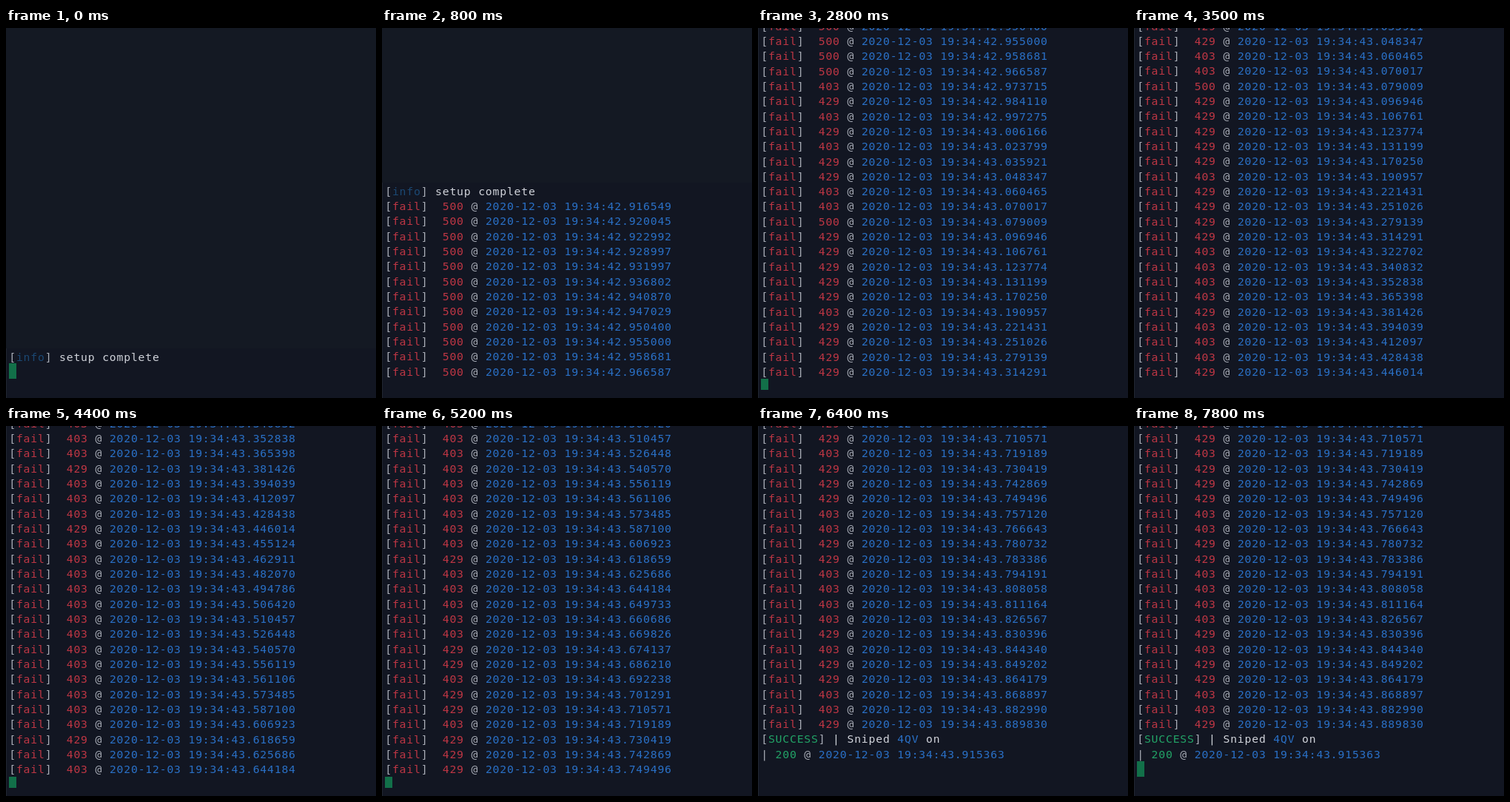
Recreate the animation shown at these times as an HTML page. Size 500 by 500 pixels, loop 8000 ms.

```html
<!DOCTYPE html>
<html lang="en">
<head>
<meta charset="utf-8">
<title>Terminal log</title>
<style>
  html, body { margin: 0; width: 100%; height: 100%; overflow: hidden; background: #141923; }
  #stage { position: relative; width: 500px; height: 500px; overflow: hidden; }
  #floor { position: absolute; inset: 0; background: #121622; box-shadow: inset 1px 0 #20252f; }
  #view { position: absolute; left: 0; top: 0; width: 500px; overflow: hidden; }
  #log {
    position: absolute; left: 4.2px; top: 1.6px;
    font: 14.8px/20.34px "DejaVu Sans Mono", "Noto Sans Mono", monospace;
    letter-spacing: .78px; color: #a9adb7; white-space: pre;
  }
  #log div { height: 20.34px; }
  #cursor { position: absolute; left: 4px; width: 10px; background: #127049; }
  .info { color: #1b4873; }
  .fail { color: #bd3644; }
  .time { color: #2a70c6; }
  .good { color: #22a266; }
  .say { color: #d0d3da; }
</style>
</head>
<body>
<div id="stage">
  <div id="floor"></div>
  <div id="view"><div id="log"></div></div>
  <div id="cursor"></div>
</div>
<script>
const LOOP = 8000, ROW = 20.34, TOP = 6, ROWS = 23;
const $ = id => document.getElementById(id);

// Key points: refresh number, replies by then, microseconds past 19:34:42,
// and the share of 500 and 429 codes on the way there (the rest are 403).
const keys = [
  [1, 0, 912000, 0, 0],
  [3, 12, 966587, 1, 0],
  [6, 25, 1123774, .15, .5],
  [11, 32, 1314291, 0, .85],
  [14, 41, 1446014, 0, .55],
  [18, 57, 1644184, 0, .06],
  [23, 77, 1826567, 0, .35],
  [26, 86, 1915363, 0, .55]
];
const rests = [0, 77, 86]; // reply counts that leave a blank row below the cursor

let seed = 7;
const random = () => (seed = seed * 16807 % 2147483647) / 2147483647;

const span = (name, text) => `<span class="${name}">${text}</span>`;
function stamp(micro) {
  const seconds = (42 + Math.round(micro) / 1e6).toFixed(6);
  return span("time", `2020-12-03 19:34:${seconds}`);
}
function pickCode(share500, share429) {
  const roll = random();
  return roll < share500 ? 500 : roll < share500 + share429 ? 429 : 403;
}

const lines = [`[${span("info", "info")}] ${span("say", "setup complete")}`];
keys.slice(1).forEach(([, last, end, share500, share429], k) => {
  const [, first, start] = keys[k];
  const count = last - first;
  for (let n = 1; n <= count; n++) {
    const wobble = n < count ? random() * .8 : 0;
    const micro = start + (end - start) * (n - wobble) / count;
    const code = pickCode(share500, share429);
    lines.push(`[${span("fail", "fail")}]  ${span("fail", code)} @ ${stamp(micro)}`);
  }
});
lines.splice(-2, 2,
  `[${span("good", "SUCCESS")}] ${span("say", "| Sniped")} ${span("time", "4QV")} ${span("say", "on")}`,
  `| ${span("good", "200")} @ ${stamp(keys.at(-1)[2])}`
);
$("log").innerHTML = lines.map(line => `<div>${line}</div>`).join("");

function repliesAt(refresh) {
  const next = keys.findIndex(key => key[0] > refresh);
  if (next === 0) return 0;
  if (next < 0) return keys.at(-1)[1];
  const [r0, n0] = keys[next - 1], [r1, n1] = keys[next];
  return Math.round(n0 + (n1 - n0) * (refresh - r0) / (r1 - r0));
}

function draw(t) {
  // The screen refreshes every 240 ms, aligned up to tenths of a second.
  const refresh = Math.floor((Math.floor(t / 100) * 100 - 80) / 240);
  const shownAt = Math.ceil((80 + 240 * refresh) / 100) * 100;
  const replies = repliesAt(refresh);
  const end = TOP + (ROWS - rests.includes(replies)) * ROW;
  const start = end - (replies + 1) * ROW;
  $("log").style.transform = `translateY(${start}px)`;
  $("view").style.height = end + "px";
  $("floor").style.top = Math.max(0, start) + "px";
  const cursor = $("cursor").style;
  cursor.top = end + "px";
  cursor.height = Math.min(ROW, 489.5 - end) + "px";
  cursor.opacity = shownAt % 1300 < 600 ? 1 : 0;
}

const origin = performance.now();
function tick() {
  draw((performance.now() - origin) % LOOP);
  requestAnimationFrame(tick);
}
tick();
</script>
</body>
</html>
```
